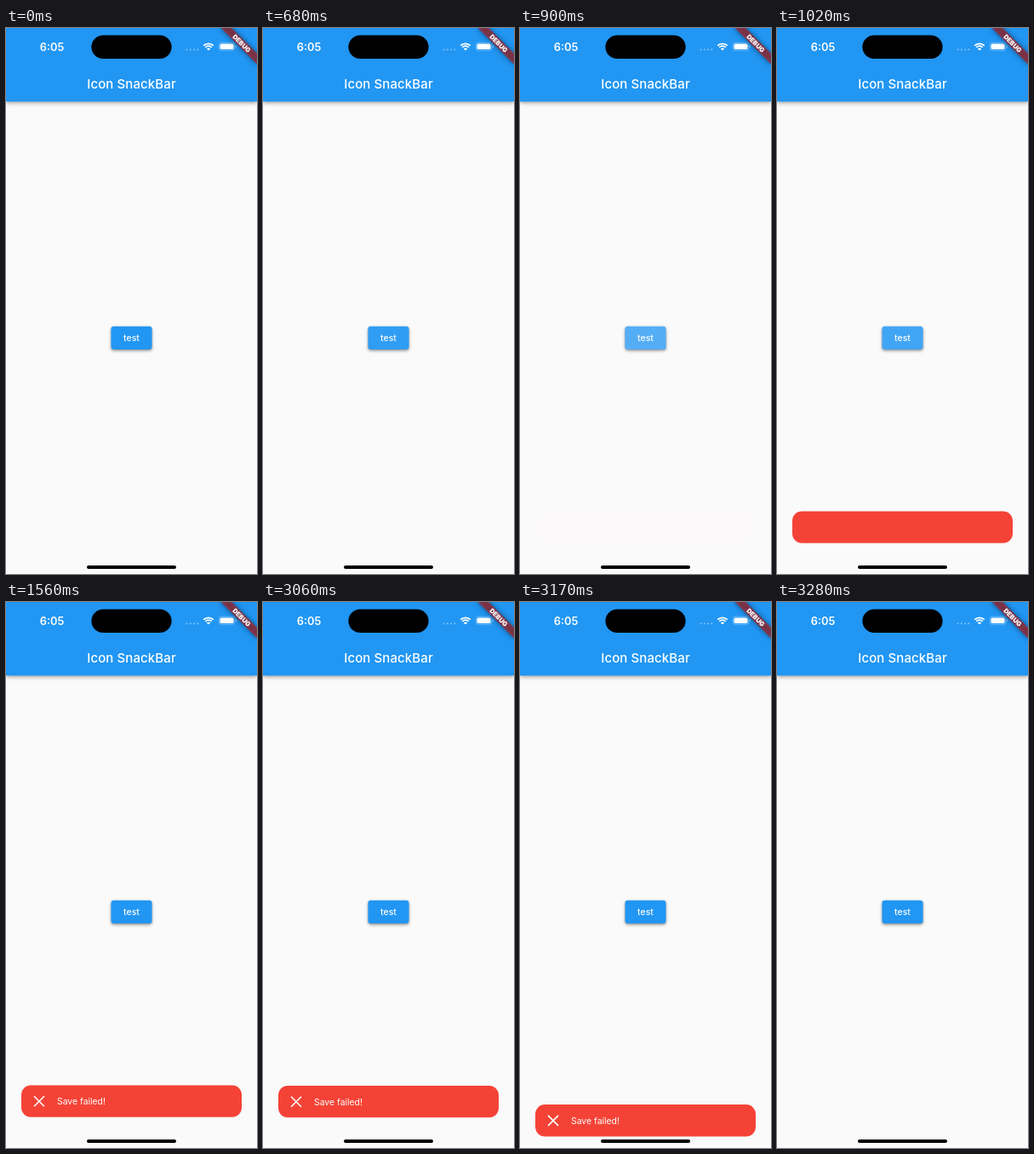
Recreate the animation shown at these times as an HTML page with a canvas. Size 295 by 640 pixels, loop 3340 ms.

```html
<!DOCTYPE html>
<html lang="en">
<head>
<meta charset="utf-8">
<title>Icon SnackBar</title>
<style>
  html, body { margin: 0; width: 100%; height: 100%; overflow: hidden; background: #fafafa; }
  canvas { display: block; width: 295px; height: 640px; }
</style>
</head>
<body>
<canvas id="stage"></canvas>
<script>
const W = 295, H = 640, LOOP = 3340;
const BLUE = '#2196f3', RED = '#f44336', WHITE = '#fff';
const STEPS = [0, 680, 790, 900, 1020, 1120, 1220, 1330, 1440, 1560, 3060, 3170, 3280];

const canvas = document.getElementById('stage');
const ctx = canvas.getContext('2d');
const dpr = window.devicePixelRatio || 1;
canvas.width = Math.round(W * dpr);
canvas.height = Math.round(H * dpr);

const ramp = (t, from, to) => Math.min(1, Math.max(0, (t - from) / (to - from)));
const ease = p => p * p * (3 - 2 * p);

function box(x, y, w, h, r, fill) {
  ctx.beginPath();
  ctx.roundRect(x, y, w, h, r);
  ctx.fillStyle = fill;
  ctx.fill();
}

function text(str, x, y, font, align = 'left', spacing = 0) {
  ctx.font = font + ' Inter, "Open Sans", sans-serif';
  ctx.textAlign = align;
  ctx.letterSpacing = spacing + 'px';
  ctx.fillStyle = WHITE;
  ctx.fillText(str, x, y);
}

function withShadow(blur, dy, alpha, draw) {
  ctx.save();
  ctx.shadowColor = `rgba(0,0,0,${alpha})`;
  ctx.shadowBlur = blur * dpr;
  ctx.shadowOffsetY = dy * dpr;
  draw();
  ctx.restore();
}

function wifi(x, y) {
  ctx.save();
  ctx.beginPath();
  ctx.moveTo(x, y);
  ctx.arc(x, y, 12, -Math.PI * 0.75, -Math.PI * 0.25);
  ctx.closePath();
  ctx.clip();
  ctx.strokeStyle = WHITE;
  ctx.lineWidth = 1.8;
  for (const r of [8.1, 5.2]) {
    ctx.beginPath();
    ctx.arc(x, y, r, Math.PI, 0);
    ctx.stroke();
  }
  ctx.beginPath();
  ctx.arc(x, y, 3, Math.PI, 0);
  ctx.fillStyle = WHITE;
  ctx.fill();
  ctx.restore();
}

function battery() {
  ctx.beginPath();
  ctx.roundRect(250.2, 17.2, 18.6, 9.2, 2.8);
  ctx.strokeStyle = 'rgba(255,255,255,.4)';
  ctx.lineWidth = 0.8;
  ctx.stroke();
  box(251.5, 18.5, 16, 6.6, 1.7, WHITE);
  box(269.8, 20.3, 1, 3, 0.5, 'rgba(255,255,255,.5)');
}

function banner() {
  ctx.save();
  ctx.translate(W, 0);
  ctx.rotate(Math.PI / 4);
  ctx.filter = `blur(${3 * dpr}px)`;
  ctx.fillStyle = 'rgba(0,0,0,.5)';
  ctx.fillRect(-30, 21, 60, 9);
  ctx.filter = 'none';
  ctx.fillStyle = 'rgba(183,28,28,.63)';
  ctx.fillRect(-30, 21, 60, 9);
  text('DEBUG', 0, 28.3, '900 7.6px', 'center');
  ctx.restore();
}

function appBar() {
  withShadow(5, 1.6, 0.42, () => box(0, 0, W, 86.3, 0, BLUE));
  text('6:05', 39.7, 26.8, '600 12.8px');
  box(100.4, 8.5, 94.2, 27.6, 13.8, '#000');
  for (let i = 0; i < 4; i++) box(211.4 + i * 4.3, 24.2, 2.2, 2.2, 1.1, 'rgba(255,255,255,.4)');
  wifi(238, 26.4);
  battery();
  text('Icon SnackBar', 147.5, 70.6, '500 15px', 'center', 0.1);
}

function button(t) {
  withShadow(3.5, 1.5, 0.45, () => box(123.5, 349.8, 48, 27, 3, BLUE));
  const press = 0.23 * ramp(t, 620, 840) * (1 - ramp(t, 900, 1220));
  if (press > 0) box(123.5, 349.8, 48, 27, 3, `rgba(255,255,255,${press})`);
  text('test', 147.5, 366.9, '500 10.5px', 'center');
}

function snackBar(t) {
  const fade = ease(ramp(t, 893, 1015));
  if (fade === 0 || t >= 3280) return;
  const slide = 0.5 * (Math.max(0, t - 3045) / 15) ** 1.8;
  ctx.save();
  ctx.translate(0, slide);
  ctx.globalAlpha = fade;
  box(18, 566.4, 259, 37.4, 11.2, RED);

  const open = ease(ramp(t, 1170, 1560));
  if (open > 0) {
    ctx.globalAlpha = open;
    text('Save failed!', 32 + 7.5 * (1 - open) + 28 * open, 589, '400 10.4px');
    ctx.globalAlpha = 1;
    ctx.beginPath();
    ctx.rect(30, 567, 30 * open, 36);
    ctx.clip();
    cross(39, 585.2, 6);
  }
  ctx.restore();
}

function cross(x, y, r) {
  ctx.beginPath();
  ctx.moveTo(x - r, y - r);
  ctx.lineTo(x + r, y + r);
  ctx.moveTo(x + r, y - r);
  ctx.lineTo(x - r, y + r);
  ctx.strokeStyle = WHITE;
  ctx.lineWidth = 1.6;
  ctx.stroke();
}

function frame() {
  const now = performance.now() % LOOP;
  const t = STEPS.findLast(s => s <= now);
  ctx.setTransform(dpr, 0, 0, dpr, 0, 0);
  box(0, 0, W, H, 0, '#fafafa');
  appBar();
  button(t);
  snackBar(t);
  banner();
  box(95, 630, 105, 4, 2, '#000');
  requestAnimationFrame(frame);
}
frame();
</script>
</body>
</html>
```
